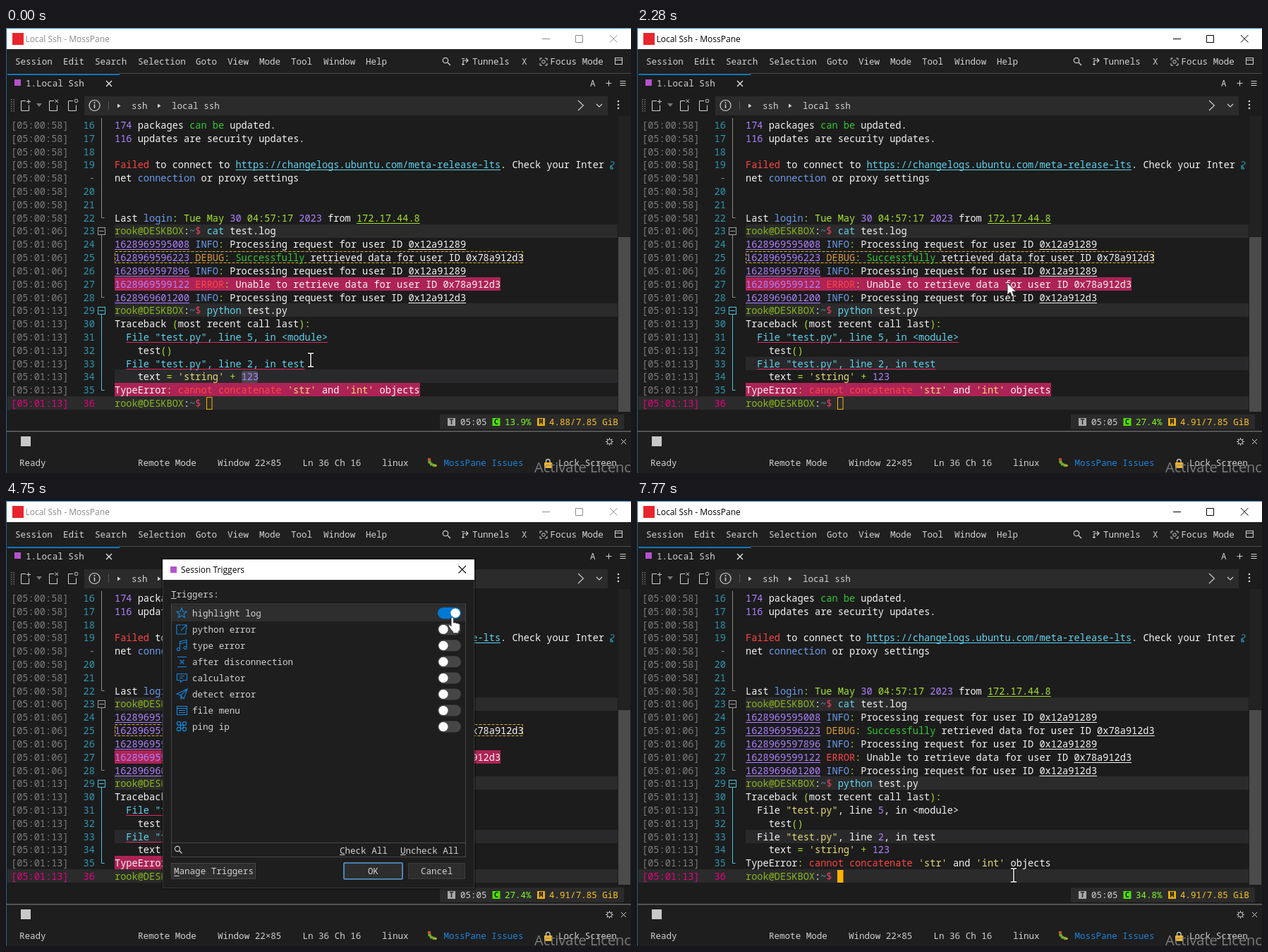
An HTML page that plays this animation: 886x632 px, repeating every 8 s.

```html
<!DOCTYPE html>
<html lang="en">
<head>
<meta charset="utf-8">
<title>Terminal triggers</title>
<style>
html, body { margin: 0; width: 100%; height: 100%; overflow: hidden; background: #1c1c1c; }
svg { display: block; width: 886px; height: 632px; }
text { white-space: pre; font-family: "Roboto Mono", "Noto Sans Mono", monospace; font-size: 12.55px; }
text.term { font-size: 13.61px; }
text.sans { font-family: "Open Sans", "Noto Sans", sans-serif; font-size: 12px; }
</style>
</head>
<body>
<svg id="stage" viewBox="0 0 886 632" xmlns="http://www.w3.org/2000/svg"></svg>
<script>
const LOOP = 8000;
const CW = 8.165, UW = 7.53, PITCH = 18.81, LEFT = 154;
const INK = "#d2d2d2", BLUE = "#0078d4", BAND = "#2b2b2b", ROSE = "#ad2355";
const esc = s => s.replace(/&/g, "&amp;").replace(/</g, "&lt;");
const text = (x, y, s, fill = INK, cls = "") => `<text x="${x}" y="${y}" fill="${fill}" class="${cls}">${esc(s)}</text>`;
const rect = (x, y, w, h, fill, more = "") => `<rect x="${x}" y="${y}" width="${w}" height="${h}" fill="${fill}" ${more}/>`;
const path = (d, stroke = INK, w = 1, fill = "none") => `<path d="${d}" stroke="${stroke}" stroke-width="${w}" fill="${fill}"/>`;
const dot = (x, y, r, fill, more = "") => `<circle cx="${x}" cy="${y}" r="${r}" fill="${fill}" ${more}/>`;
const group = (id, body) => `<g id="${id}">${body}</g>`;
const box = (x, y, w, h, stroke, fill = "none", more = "") => rect(x + .5, y + .5, w - 1, h - 1, fill, `stroke="${stroke}" ${more}`);

// "_" marks the mnemonic letter that follows it
function label(x, y, s, fill) {
  const i = s.indexOf("_");
  const line = i < 0 ? "" : path(`M${x + i * UW} ${Math.round(y + 1.5) + .5}h${UW}`, fill || INK);
  return text(x, y, s.replace("_", ""), fill) + line;
}

// ---------- terminal ----------
const HUES = { w: "#f4f4f4", p: "#ae81ff", g: "#32c832", r: "#ff4444", c: "#5fd3ee", b: "#6c9cec",
  l: "#a6e22e", u: "#88b81c", y: "#e6db74", o: "#d99a3c", t: "#4f8fb0", k: "#e8405c" };
const rowY = i => 143 + PITCH * i;
const rowTop = i => Math.floor(128.6 + PITCH * i);
const band = (i, x, w, fill) => rect(x, rowTop(i), w, 19, fill);

// {x words}: hue x; an upper case hue also underlines
function rich(row, src, lineHue) {
  let col = 0, out = "";
  for (const m of src.matchAll(/\{(\w) ([^}]*)\}|([^{]+)/g)) {
    const key = m[1] || "w", s = m[2] || m[3], hue = HUES[key.toLowerCase()];
    const x = LEFT + col * CW;
    out += text(x.toFixed(2), rowY(row).toFixed(2), s, hue, "term");
    if (key < "a") out += path(`M${x} ${Math.round(rowY(row) + 2) + .5}h${s.length * CW}`, lineHue || hue);
    col += s.length;
  }
  return out;
}
const unlined = s => s.replace(/\{[A-Z]/g, k => k.toLowerCase());
const prompt = "{u rook@DESKBOX}:{t ~}{k $} ";
const request = (n, id) => `{P ${n}} {b INFO}{l :} Processing request for user ID {W ${id}}`;
const lines = {
  0: "{p 174} packages {g can be} updated.",
  1: "{p 116} updates are security updates.",
  3: "{r Failed} to connect to {C https://changelogs.ubuntu.com/meta-release-lts}. Check your Inter",
  4: "net {b connection} or proxy settings",
  7: "Last {b login}{l :} {l Tue May} {p 30} {l 04:57:17} {p 2023} from {L 172.17.44.8}",
  8: prompt + "{c cat} test.log",
  9: request("1628969595008", "0x12a91289"),
  11: request("1628969597896", "0x12a91289"),
  13: request("1628969601200", "0x12a912d3"),
  14: prompt + "{c python} test.py",
  15: "Traceback {l (}most recent call last{l )}{l :}",
  17: "    test{l ()}",
  19: "    text {l =} {y 'string'} {l +} {p 123}",
  20: "TypeError{l :} {r cannot concatenate} {y 'str'} and {y 'int'} objects",
  21: prompt
};
const logRows = [
  [10, "{P 1628969596223} {o DEBUG}{l :} {g Successfully} retrieved data for user ID {W 0x78a912d3}"],
  [12, "{P 1628969599122} {r ERROR}{l :} Unable to retrieve data for user ID {W 0x78a912d3}"]];
const fileRows = [[16, 5, "<module>"], [18, 2, "test"]];

function terminal() {
  let s = [8, 14].map(i => band(i, LEFT, 713, BAND)).join("") + band(21, 2, 865, BAND);
  s += `<rect id="hoverLine" x="${LEFT}" width="713" height="19" fill="#29292b"/>`;
  s += group("word", rect(334, 487, 23, 17, "#484850", 'rx="3"'));
  s += group("marks",
    band(12, LEFT, 547, ROSE) + band(20, LEFT, 433, ROSE) +
    rect(154.5, 317.5, 578, 16, "none", 'stroke="#d8b02c" stroke-dasharray="4 2"') +
    logRows.map(([r, w]) => rich(r, unlined(w))).join("") +
    fileRows.map(([r, n, at]) => rich(r, `  {C File "test.py", line ${n}, in ${at}}`, "#e0285e")).join(""));
  s += group("plain", logRows.map(([r, w]) => rich(r, w)).join("") +
    fileRows.map(([r, n, at]) => rich(r, `  File {y "test.py"}, line {p ${n}}, in ${at}`)).join(""));
  for (const i in lines) s += rich(+i, lines[i]);
  for (let i = 0; i < 22; i++) {
    const last = i === 21, stamp = i < 8 ? "00:58" : i < 14 ? "01:06" : "01:13";
    const num = i === 4 ? " -" : String(i < 4 ? 16 + i : 15 + i);
    s += text(7, rowY(i), `[05:${stamp}]`, last ? "#e6007e" : "#7c7c7c", "term");
    s += text(109.5, rowY(i), num, last ? "#e6007e" : i === 4 ? "#7c7c7c" : "#2e96b0", "term");
  }
  const fold = (y, hue) => box(130, y - 5, 11, 11, hue, "#1c1c1c") + path(`M132 ${y + .5}h7`, hue);
  s += path("M135.5 128V269.5h4M135.5 294V382.5h4", "#8a8a8a") + path("M135.5 407V514.5h4", "#4fc3d8");
  s += fold(288, "#a0a0a0") + fold(401, "#4fc3d8");
  s += path("M857 190h4q1 0 1 2t-5 4l4 4M857 196v4h4", "#2e96b0", 1.2);
  s += `<rect id="caret" x="284.5" y="524.5" width="7.5" height="17" stroke="#ffb000"/>`;
  return s;
}

// ---------- window ----------
function chrome() {
  let s = rect(0, 0, 886, 632, "#1c1c1c") + rect(0, 0, 886, 30, "#fff") + rect(9, 7, 16, 17, "#e8252c");
  s += `<text id="title" class="sans" x="27.5" y="20">Local Ssh - MossPane</text>`;
  s += `<path id="winBtns" d="M760 15.5h11M807.5 10.5h10v10h-10zM856 10l10.500 10.500m0 -10.500l-10.500 10.500" fill="none"/>`;
  s += rect(1, 30, 885, 35, "#1f1f1f");
  [[13, "Session"], [81, "Edit"], [126, "Search"], [187, "Selection"], [269, "Goto"], [314, "View"], [359, "Mode"],
   [404, "Tool"], [450, "Window"], [510, "Help"], [661, "Tunnels"], [731, "X"], [771.5, "Focus Mode"]]
    .forEach(([x, w]) => s += text(x, 52, w));
  s += dot(623, 46, 3.7, "none", `stroke="${INK}" stroke-width="1.2"`) + path("M626 49l4 4", INK, 1.3);
  s += path("M648 53v-7h6M652 43l3 3l-3 3M646 51.500h4M650 43.500h-4", INK, 1.2);
  s += path("M757 46v-3h3m4 0h3v3m0 4v3h-3m-4 0h-3v-3") + dot(762, 48, 2.3, "none", `stroke="${INK}"`);
  s += box(863, 42, 11, 10, INK) + path("M863 45.500h11");
  // tabs
  s += rect(160, 64, 726, 1, "#4a4a4a") + rect(2, 65, 159, 2, "#1177bb") + rect(12, 73, 9, 9, "#b452cd");
  s += text(28, 83, "1.Local Ssh") + path("M142 75l8 8m0 -8l-8 8", "#eee", 1.2);
  s += text(828, 83, "A") + path("M850.500 78.500h8m-4 -4v8M870.500 75.500h8m-8 3h8m-8 3h8");
  // toolbar
  s += rect(111, 97, 742, 27, BAND);
  for (let i = 0; i < 6; i++) s += rect(7, 101 + i * 3.2, 1.5, 1.5, "#777") + rect(10.5, 101 + i * 3.2, 1.5, 1.5, "#777");
  s += [21, 61, 88].map(x => path(`M${x + 7} 103.500h-6.500v14h11v-8`)).join("");
  s += path("M29 104.500h6m-3 -3v6M69.500 101.500l4.500 4.500m0 -4.500l-4.500 4.500") + dot(99.5, 103.5, 2.3, "none", `stroke="${INK}"`);
  s += path("M43 107h8l-4 5z", "none", 0, "#777");
  s += dot(125.5, 110, 7.5, "none", `stroke="${INK}" stroke-width="1.2"`) + path("M125.500 108.500v5.500M125.500 105v2", INK, 1.5);
  s += path("M145.500 104v12", "#555") + path("M158 107.500l4.500 3l-4.500 3zM215 107.500l4.500 3l-4.500 3z", "none", 0, INK);
  s += text(178, 115, "ssh") + text(235, 115, "local ssh");
  s += path("M811 103l7.500 7l-7.500 7M837 108l4 4l4 -4", INK, 1.1) + [104, 109, 114].map(y => dot(868, y, 1.3, INK)).join("");
  s += terminal();
  // scrollbar and meters
  s += rect(868, 125, 17, 420, "#222") + rect(868, 297, 17, 248, "#4b4b4b") + rect(615, 549, 261, 21, BAND);
  [[626, "T", "#a8a8a8", "#222"], [689.5, "C", "#4fe000", "#111"], [753, "M", "#e8b010", "#111"]].forEach(([x, c, bg, fg]) =>
    s += rect(x, 554, 11, 11, bg) + `<text x="${x + 2.5}" y="563" style="font-size:10px;font-weight:700" fill="${fg}">${c}</text>`);
  s += text(644, 564, "05:05") + `<text id="cpu" x="707" y="564" fill="#7fff20"></text><text id="mem" x="770" y="564" fill="#ffc420"></text>`;
  // bottom panel
  s += rect(0, 572, 886, 60, "#1e1e1e") + rect(0, 572, 886, 1.5, "#666") + rect(21, 580, 14, 14, "#c8c8c8");
  s += dot(855.5, 587.5, 3.2, "none", `stroke="${INK}"`);
  for (let a = 0; a < 8; a++) s += `<path d="M855.500 584v-2" stroke="${INK}" transform="rotate(${a * 45} 855.5 587.5)"/>`;
  s += path("M872 584l7 7m0 -7l-7 7");
  [[19, "Ready"], [187, "Remote Mode"], [300, "Window 22×85"], [420.5, "Ln 36 Ch 16"], [533, "linux"], [783, "Lock Screen"]]
    .forEach(([x, w]) => s += text(x, 622, w));
  s += text(620.5, 622, "MossPane Issues", "#1d83d8");
  [[600, 613], [600.5, 616.5], [603, 619.5], [606.5, 621]].forEach(([x, y]) => s += dot(x, y, 2.3, "#6fae2e"));
  s += dot(600, 613, 2.1, "#d8432e") + dot(609, 621.5, 1.8, "#c9a22a");
  s += path("M765.500 618v-2.500a2.800 3 0 0 1 5.600 0v2.500", "#c8c8c8", 1.4) + rect(763, 617, 11, 8, "#f0b428", 'rx="1"');
  s += `<text class="sans" x="749" y="631" fill="#8c8c8c" opacity=".85" style="font-size:20px">Activate Licence</text>`;
  return s + rect(0, 0, 1, 632, "#25648f") + rect(0, 0, 886, 1, "#3d8fc4");
}

// ---------- context menu ----------
function menu() {
  let s = box(432, -2, 337, 473, "#4c4c4c", BAND) + rect(433, 27, 335, 24, "#202020");
  [26, 51, 81, 140, 229, 289, 349, 379, 409, 439].forEach(y => s += path(`M433 ${y + .5}h335`, "#4c4c4c"));
  s += `<rect id="pick" x="432" width="337" height="31" fill="${BLUE}"/>`;
  ["#d80000", "#d89000", "#d8d800", "#007800", "#3c5cc8", "#00d8d8", "#780078"].forEach((c, i) => s += dot(465 + i * 44, 40, 5.6, c));
  [[13, "Paste _Selected Text", "Ctrl+Shift+X"], [66, "_Highlight Text..."], [97, "_Find...", "Alt+F"], [126, "Search _Online", ">"],
   [156, "Clear Scroll_back", "Ctrl+Shift+L"], [186, "Clear _Screen", "Ctrl+L"], [215, "Clear _All"],
   [245, "Select _All", "Ctrl+Shift+A"], [274, "Select _Fold"], [305, "Goto _Fold Header", "Ctrl+Shift+Left"],
   [334, "Goto _Next Fold Header", "Ctrl+Shift+Right"], [365, "Session _Triggers..."], [395, "_Transfer Binary", ">"],
   [425, "_Log", ">"], [455, "_Reset", ">"]].forEach(([y, w, key]) => {
    s += label(466, y + 4.5, w);
    if (key === ">") s += path(`M748 ${y - 3}l4.500 3l-4.500 3z`, "none", 0, "#aaa");
    else if (key) s += text(621, y + 4.5, key);
  });
  s += path("M446.500 18.500h-5.500v-13h11v5M446.500 11.500h9.500v9h-9.500z");
  s += path(star(448, 66, 7.5)) + dot(449, 96, 7.3, "none", `stroke="${INK}" stroke-width="1.1"`) + path("M444 101l-3 3", INK, 1.2);
  s += path("M444 360a6.800 6.800 0 1 0 4.500 -2M445 361l4 4", INK, 1.1);
  return s;
}
function star(cx, cy, r) {
  let d = "";
  for (let i = 0; i < 10; i++) {
    const a = i * Math.PI / 5, q = i % 2 ? r * .42 : r;
    d += (i ? "L" : "M") + (cx + q * Math.sin(a)).toFixed(1) + " " + (cy - q * Math.cos(a)).toFixed(1);
  }
  return d + "z";
}

// ---------- dialog ----------
const listTop = 148, listPitch = 23.05;
function dialog() {
  let s = rect(220, 81, 446, 471, "#000", 'opacity=".3"') + box(222, 83, 442, 467, "#363636", "#1e1e1e") + rect(222, 83, 442, 29, "#fff");
  s += rect(233, 93, 9, 9, "#b452cd") + text(248, 102, "Session Triggers", "#000", "sans") + path("M641.500 92l10.500 10.500m0 -10.500l-10.500 10.500", "#111", 1.1);
  s += label(234, 136.5, "_Triggers:") + rect(235, listTop, 416, 23, "#2a2a2a");
  s += `<rect id="hoverRow" x="235" width="416" height="23" fill="#2e2e2e"/>` + box(234, 146, 418, 360, "#484848") + path("M234 485.500h418", "#484848");
  const icons = ["", "M248 176h-6v13h13v-6M249 176h7v7M256 176l-8 8",
    "M246.500 210.500v-11l9.500 -2v11M246.500 202.500l9.500 -2M246.500 210.500a2 2 0 1 1 -4 0a2 2 0 1 1 4 0M256 208.500a2 2 0 1 1 -4 0a2 2 0 1 1 4 0",
    "M243 221.500h13M243 235.500h13M246.500 225.500l6 6m0 -6l-6 6", "M242.500 245.500h14v9h-6l-3 3v-3h-5zM246 248.500h7M246 251.500h5",
    "M242 274l15 -7l-5 14l-4 -5zM248 276l9 -9M248 276v5l2 -2", "M242.500 291.500h14v12h-14zM242.500 294.500h14M245 297.500h9M245 300.500h9", ""];
  ["highlight log", "python error", "type error", "after disconnection", "calculator", "detect error", "file menu", "ping ip"].forEach((w, i) => {
    const y = 159.2 + i * listPitch;
    s += text(264, y + 4.8, w) + path(i ? icons[i] : star(249, 159.5, 7.5), "#1686dc", 1.1);
    s += `<rect id="track${i}" x="612" y="${y - 8}" width="33" height="16" rx="8" fill="#464646"/>` + `<circle id="knob${i}" cx="620" cy="${y}" r="6.6" fill="#fff"/>`;
  });
  [[245, 316], [253, 316], [245, 324], [253, 324]].forEach(([x, y]) => s += dot(x, y, 2.6, "none", 'stroke="#1686dc" stroke-width="1.3"'));
  s += box(247, 318, 5, 5, "#1686dc");
  s += dot(243, 494, 3.6, "none", `stroke="${INK}" stroke-width="1.1"`) + path("M245.500 496.500l4 4", INK, 1.2);
  s += label(473, 500.5, "_Check All") + label(559, 500.5, "_Uncheck All");
  s += box(234, 514, 120, 23, "#444", "#2d2d2d") + label(238, 530, "_Manage Triggers");
  s += rect(479, 514, 83, 23, "#2d2d2d", 'stroke="#5b9bd8" stroke-width="1.6" rx="1"') + text(513, 530, "OK");
  return s + box(570, 514, 81, 23, "#3c3c3c", "#2d2d2d") + text(588, 530, "Cancel");
}

const beamShape = "M-4 -9h3l1 1l1 -1h3M0 -8v17M-4 10h3l1 -1l1 1h3";
const pointers =
  group("beam", path(beamShape, "#000", 3) + path(beamShape, "#fff", 1.5)) +
  group("arrow", path("M0 0v17l4 -3.800l2.800 6.500l2.800 -1.200l-2.800 -6.300h5.500z", "#222", .8, "#fff")) +
  group("hand", path("M-2 2q0 -2 1.800 -2t1.800 2v6q3 -1 3.500 .5q2.500 -.8 3 .8q2.500 -.5 2.500 2v5q0 3 -2 4v2.500h-8v-2q-3 -3 -5.500 -7q-1.500 -2.500 .5 -3q1.200 0 2.400 2z", "#222", .9, "#fff"));

const stage = document.getElementById("stage");
stage.innerHTML = chrome() + group("menu", menu()) + group("dialog", dialog()) + group("pointer", pointers);
const el = {};
stage.querySelectorAll("[id]").forEach(n => el[n.id] = n);

// ---------- motion: [ms, x, y], each place held until the next ----------
const moves = [[0, 432, 471], [1100, 448, 455], [1290, 488, 421], [1480, 517, 383], [1670, 525, 362],
  [2700, 553, 300], [2930, 609, 226], [3180, 637, 194.500], [3330, 636, 190], [4160, 636, 188], [4530, 634, 170], [4750, 633, 165],
  [5740, 632, 176], [5940, 620, 215], [6140, 596, 290], [6340, 570, 372], [6540, 550, 440], [6750, 543, 470],
  [6970, 530, 508], [7170, 527, 523], [7570, 532, 529], [7770, 534, 531]];
const show = (n, on) => n.style.display = on ? "" : "none";
const set = (n, k, v) => n.setAttribute(k, v);

function toggle(i, p) {
  set(el["knob" + i], "cx", 637 - 17 * p);
  set(el["track" + i], "fill", p < .5 ? BLUE : "#464646");
}
const ramp = (t, from) => Math.min(1, Math.max(0, (t - from) / 150));

function draw(t) {
  const [, x, y] = moves.filter(m => m[0] <= t).pop();
  const menuOn = t >= 420 && t < 2280, dialogOn = t >= 2480 && t < 7370, done = t >= 7370;
  const active = t >= 220 && !dialogOn;
  show(el.menu, menuOn);
  show(el.dialog, dialogOn);
  show(el.marks, !done);
  show(el.plain, done);
  show(el.word, t < 810);
  set(el.hoverLine, "y", rowTop(t < 220 ? 19 : 18));
  set(el.title, "fill", active ? "#000" : "#8a8a8a");
  set(el.winBtns, "stroke", active ? "#000" : "#8a8a8a");
  set(el.caret, "fill", done ? "#ffb000" : "none");
  el.cpu.textContent = t < 1480 ? "13.9%" : t < 7570 ? "27.4%" : "34.8%";
  el.mem.textContent = t < 1480 ? "4.88/7.85 GiB" : "4.91/7.85 GiB";

  const slot = Math.floor((y - 349) / 30);
  show(el.pick, menuOn && t >= 1100 && slot >= 0);
  set(el.pick, "y", 349 + slot * 30);

  const row = Math.floor((y - listTop) / listPitch);
  const onRow = dialogOn && row >= 0 && row < 8;
  show(el.hoverRow, onRow);
  set(el.hoverRow, "y", listTop + row * listPitch);
  toggle(0, ramp(t, 5150));
  toggle(1, ramp(t, 3760));

  const hand = onRow && x > 612, beam = t < 420 || t >= 7570;
  show(el.hand, hand);
  show(el.beam, beam);
  show(el.arrow, !hand && !beam);
  set(el.pointer, "transform", `translate(${x} ${y})`);
}

const start = performance.now();
function tick(now) {
  draw(Math.max(0, now - start) % LOOP);
  requestAnimationFrame(tick);
}
draw(0);
requestAnimationFrame(tick);
</script>
</body>
</html>
```
